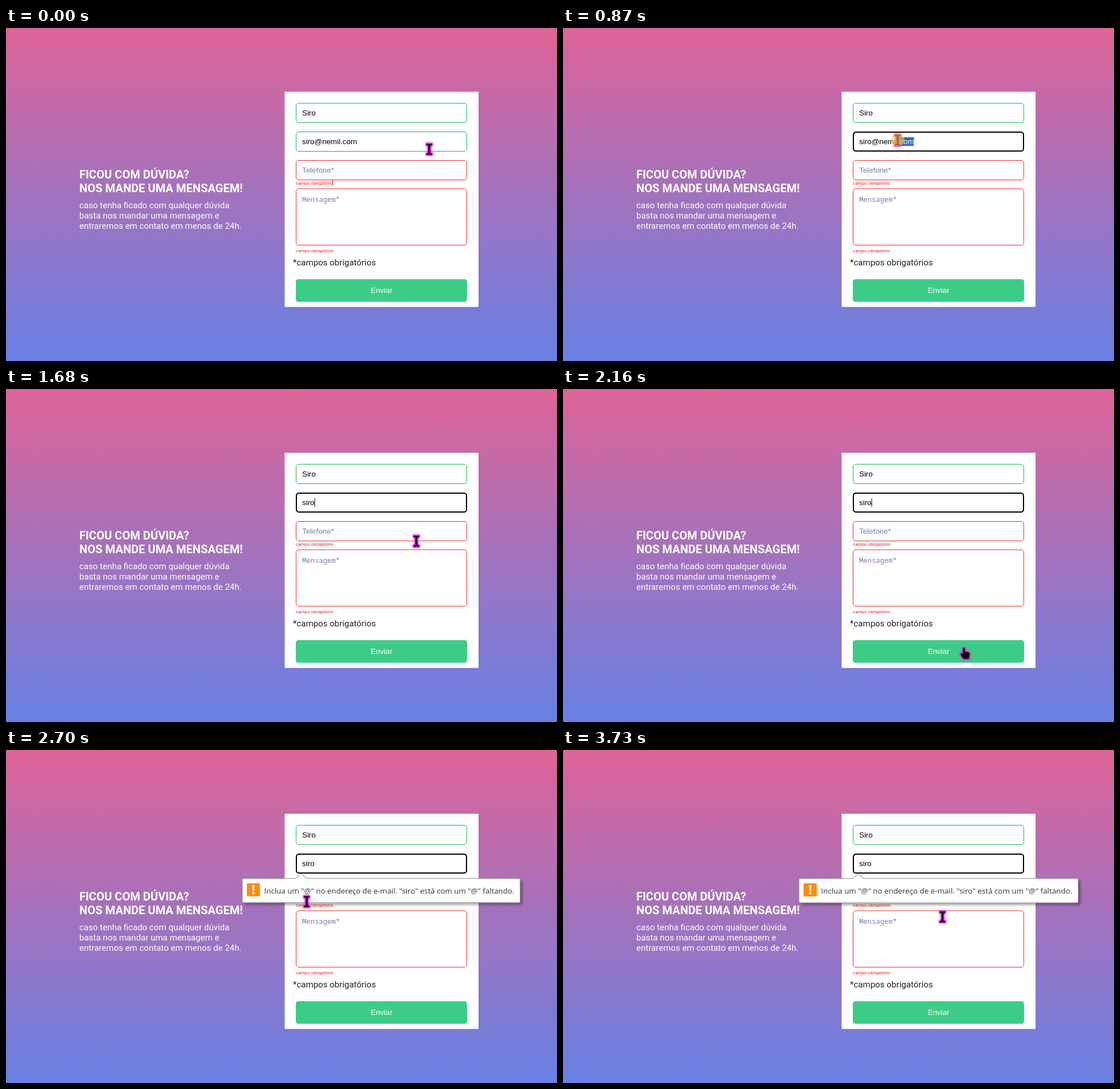
An HTML page for the animation above (3930 ms loop, 962 by 582 pixels).

```html
<!DOCTYPE html>
<html lang="pt-BR">
<head>
<meta charset="utf-8">
<title>Formulário de contato</title>
<style>
  html, body { margin: 0; width: 100%; height: 100%; overflow: hidden; }
  svg { display: block; width: 962px; height: 582px; }
  text { white-space: pre; }
  .roboto { font-family: Roboto, sans-serif; font-size: 15px; }
  .title { font-size: 20px; font-weight: 700; }
  .error { font-size: 8px; fill: #ee1c1c; }
  .input { font-family: "Liberation Sans", Arial, sans-serif; font-size: 13.333px; }
  .hint { fill: #8479ac; }
  .mono { font-family: "Noto Sans Mono", monospace; font-size: 12.2px; }
  .tip { font-family: "Open Sans", sans-serif; font-size: 13.34px; fill: #333; }
  .field { fill: #fff; stroke: #f02a2a; }
  .ok { stroke: #10bc40; }
  .halo { fill: #e41fe4; stroke: #e41fe4; stroke-width: 4.4; stroke-linejoin: round; filter: url(#blur); }
</style>
</head>
<body>
<svg viewBox="0 0 962 582" xmlns="http://www.w3.org/2000/svg">
  <defs>
    <linearGradient id="sky" x1="0" y1="0" x2="0" y2="1">
      <stop offset="0" stop-color="#de6497"/>
      <stop offset="1" stop-color="#6780e3"/>
    </linearGradient>
    <filter id="blur" x="-80%" y="-80%" width="260%" height="260%">
      <feGaussianBlur stdDeviation="1.1"/>
    </filter>
    <filter id="shadow" x="-5%" y="-20%" width="110%" height="160%">
      <feDropShadow dx="3.5" dy="3.5" stdDeviation="2" flood-color="#000" flood-opacity=".35"/>
    </filter>
  </defs>

  <rect width="962" height="582" fill="url(#sky)"/>
  <g class="roboto" fill="#fff">
    <text class="title" x="128" y="263">FICOU COM DÚVIDA?</text>
    <text class="title" x="128" y="287">NOS MANDE UMA MENSAGEM!</text>
    <text x="128" y="315">caso tenha ficado com qualquer dúvida</text>
    <text x="128" y="333">basta nos mandar uma mensagem e</text>
    <text x="128" y="351">entraremos em contato em menos de 24h.</text>
  </g>

  <rect x="486.5" y="111.5" width="338.5" height="376" fill="#fff"/>
  <rect class="field ok" x="506.5" y="131.5" width="298" height="34" rx="4.5"/>
  <rect class="field" x="506.5" y="231.5" width="298" height="34" rx="4.5"/>
  <rect class="field" x="506.5" y="281" width="298" height="98.5" rx="4.5"/>
  <rect id="email" class="field ok" x="506.5" y="181.5" width="298" height="34" rx="4.5"/>
  <text class="input" x="517" y="153">Siro</text>
  <rect id="sel" y="191" height="15" fill="#3166cb"/>
  <text id="mail" class="input" x="517" y="203"><tspan id="head"></tspan><tspan id="tail" fill="#fff"></tspan></text>
  <rect id="caret" x="538.5" y="191" width="1" height="15"/>
  <text class="input hint" x="517" y="252.5">Telefone*</text>
  <text class="mono hint" x="517" y="303.5">Mensagem*</text>
  <g class="roboto">
    <text class="error" x="506" y="273.5">campo obrigatório</text>
    <text class="error" x="506" y="391.5">campo obrigatório</text>
    <text x="501" y="415" fill="#20222c">*campos obrigatórios</text>
  </g>
  <rect id="mark" x="570" y="265" width="1" height="11" fill="#e02020"/>
  <rect x="506" y="439" width="299" height="39.5" rx="4.5" fill="#3dcc87"/>
  <text class="input" x="655.7" y="462.5" fill="#fff" text-anchor="middle">Enviar</text>

  <g id="tip">
    <path d="M414 224.5H506L515 216.5L524 224.5H897.5Q899.5 224.5 899.5 226.5V265Q899.5 267 897.5 267H414Q412 267 412 265V226.5Q412 224.5 414 224.5Z"
      fill="#fff" stroke="#8d8d8d" filter="url(#shadow)"/>
    <rect x="420" y="233" width="23" height="23" rx="1.5" fill="#fb8c0c"/>
    <path d="M429.5 236.5H433.5L433 246.5H430ZM429.7 248.5H433.3V252H429.7Z" fill="#fff"/>
    <text class="tip" x="450.5" y="251">Inclua um "@" no endereço de e-mail. "siro" está com um "@" faltando.</text>
  </g>

  <g id="cursor">
    <path id="halo" class="halo"/>
    <path id="shape"/>
    <circle id="press" r="11.5" cy="-1" fill="#f6d22e" fill-opacity=".55"/>
  </g>
</svg>
<script>
  const LOOP = 3930, STEP = 67.5;
  const FOCUS = 600, RELEASE = 1120, ERASE = 1340;
  const BLUR = 1990, REFOCUS = 2095, TIP = 2314;
  const MAIL = "siro@nemil.com", NAME = 4;

  const shapes = {
    beam: "M-4.5-9.5H-1.2L0-8.6L1.2-9.5H4.5V-7.2H1.5V7.2H4.5V9.5H1.2L0 8.6L-1.2 9.5H-4.5V7.2H-1.5V-7.2H-4.5Z",
    arrow: "M0 0L14 11L6.8 12.6L1.2 19Z",
    hand: "M-3.5-9Q-1.7-10.5-.6-8.5V-3L6-1.5Q8-.8 7.8 1.5L6.5 9.5H-2.5L-7.5 2.5Q-7.8 0-5.5 .2L-3.5 2Z"
  };

  // time, x, y of the pointer
  const path = [
    [0, 739, 212], [200, 712, 203], [540, 637, 196], [FOCUS, 621, 197],
    [870, 586, 196], [1070, 541, 197], [1300, 541, 199], [1450, 566, 208],
    [1610, 636, 229], [1680, 716, 260], [1780, 722, 340], [1900, 706, 452],
    [2000, 702, 462], [2200, 702, 462], [2380, 672, 425], [2560, 575, 318],
    [2700, 525, 265], [2900, 536, 262], [3260, 582, 267], [3390, 436, 256],
    [3590, 884, 254], [3730, 631, 297], [LOOP, 631, 297]
  ];

  const $ = id => document.getElementById(id);
  const within = (t, a, b) => t >= a && t < b;
  const show = (id, on) => $(id).setAttribute("visibility", on ? "visible" : "hidden");
  const set = (id, attrs) => {
    for (const k in attrs) $(id).setAttribute(k, attrs[k]);
  };

  function pointer(t) {
    const i = Math.max(1, path.findIndex(p => p[0] >= t));
    const [t0, x0, y0] = path[i - 1], [t1, x1, y1] = path[i];
    const p = (t - t0) / (t1 - t0);
    return { x: x0 + (x1 - x0) * p, y: y0 + (y1 - y0) * p };
  }

  function pointerShape(t, y) {
    if (y > 439) return "hand";
    if (y > 380 || within(t, 3100, 3700)) return "arrow";
    return "beam";
  }

  // Width of the first n characters of the address
  const pen = document.createElement("canvas").getContext("2d");
  pen.font = '13.333px "Liberation Sans", Arial, sans-serif';
  const edge = n => 517 + pen.measureText(MAIL.slice(0, n)).width;

  function nearest(x) {
    let best = MAIL.length;
    for (let n = NAME; n < MAIL.length; n++)
      if (Math.abs(edge(n) - x) < Math.abs(edge(best) - x)) best = n;
    return best;
  }

  function drawMail(t, x) {
    const text = t < ERASE ? MAIL : MAIL.slice(0, NAME);
    let cut = text.length;
    if (within(t, FOCUS, ERASE)) cut = t < RELEASE ? nearest(x) : NAME;
    $("head").textContent = text.slice(0, cut);
    $("tail").textContent = text.slice(cut);
    const left = edge(cut);
    set("sel", { x: left, width: cut < text.length ? edge(text.length) - left : 0 });

    const focused = t >= FOCUS && !within(t, BLUR, REFOCUS);
    set("email", focused
      ? { x: 507, y: 182, width: 297, height: 33, style: "stroke:#000;stroke-width:2" }
      : { x: 506.5, y: 181.5, width: 298, height: 34, style: "" });
    const since = t - (t < REFOCUS ? ERASE : REFOCUS);
    show("caret", focused && t >= ERASE && since % 1000 < 500);
  }

  function drawTip(t) {
    const p = Math.min(1, Math.max(0, (t - TIP) / 466));
    const scale = 1 - (1 - p) ** 3;
    show("tip", p > 0);
    set("tip", {
      opacity: Math.min(1, p * 1.25),
      transform: `translate(515 216) scale(${scale}) translate(-515 -216)`
    });
  }

  function draw(t) {
    const { x, y } = pointer(t);
    const d = shapes[pointerShape(t, y)];
    set("cursor", { transform: `translate(${x} ${y})` });
    set("halo", { d });
    set("shape", { d });
    show("press", within(t, FOCUS, RELEASE) || within(t, BLUR, REFOCUS));
    show("mark", t < STEP);
    drawMail(t, x);
    drawTip(t);
  }

  function tick(now) {
    const k = Math.floor((now % LOOP) / STEP + 0.2);
    draw(Math.min(k * STEP, 3730));
    requestAnimationFrame(tick);
  }
  tick(performance.now());
</script>
</body>
</html>
```
